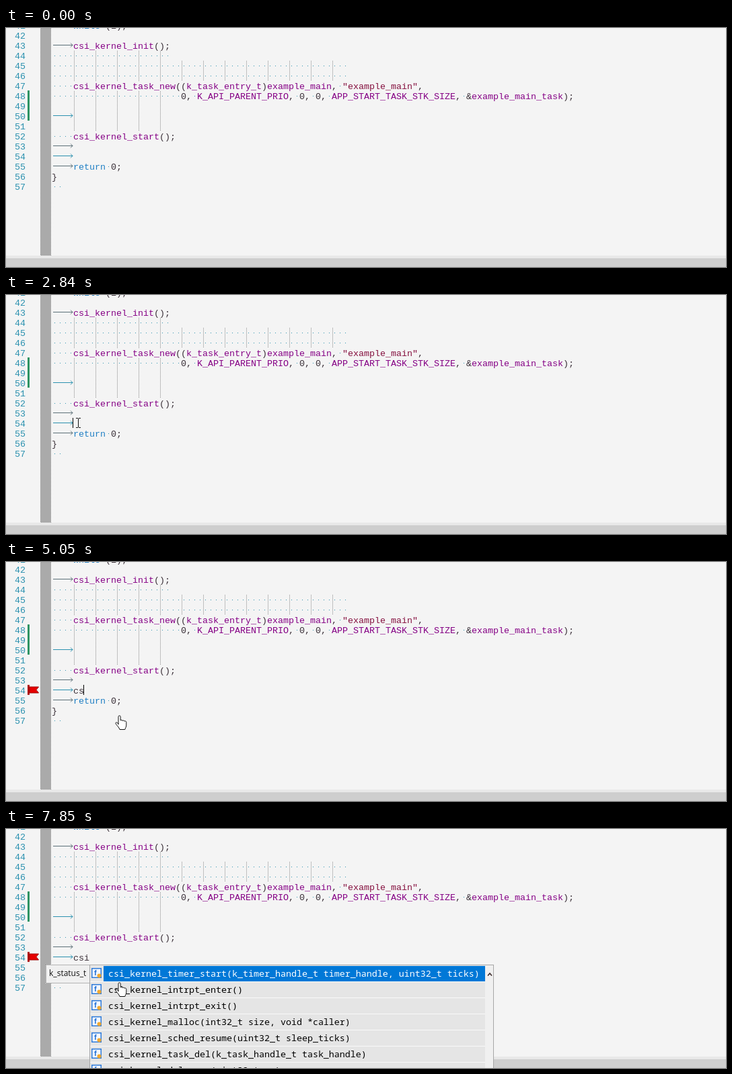
Write an HTML page with a canvas that moves like this. It is 1070x356 px and loops after 8000 ms.

```html
<!DOCTYPE html>
<html lang="en">
<head>
<meta charset="utf-8">
<title>Code completion</title>
<style>
  html, body { margin: 0; width: 100%; height: 100%; overflow: hidden; background: #f4f4f4; }
  canvas { display: block; }
</style>
</head>
<body>
<canvas id="stage" width="1070" height="356"></canvas>
<script>
const ctx = document.getElementById('stage').getContext('2d');
const LOOP = 8000, CHAR = 8, LINE = 15, ROW = 24;
const TEAL = '#2b91af', DARK = '#3a3038';
const CODE_FONT = '13.333px "Liberation Mono", monospace';
const LIST_FONT = '13.333px "Noto Sans Mono", monospace';
const LABEL_FONT = '12px "Open Sans", sans-serif';

// Column 0 is at x = 68; a leading tab is drawn as an arrow.
const source = {
  41: '\twhile (1);',
  43: '\tcsi_kernel_init();',
  44: ' '.repeat(22),
  45: ' '.repeat(55),
  46: ' '.repeat(55),
  47: '    csi_kernel_task_new((k_task_entry_t)example_main, "example_main",',
  48: ' '.repeat(24) + '0, K_API_PARENT_PRIO, 0, 0, APP_START_TASK_STK_SIZE, &example_main_task);',
  50: '\t',
  52: '    csi_kernel_start();',
  53: '\t',
  54: '\t',
  55: '\treturn 0;',
  56: '}',
  57: '  '
};

const items = [
  'task_new(k_task_entry_t task, const char *name, void *arg, k_priority_t prio, uint32_t time_quanta, void *stack)',
  'start()',
  'init()',
  'timer_start(k_timer_handle_t timer_handle, uint32_t ticks)',
  'intrpt_enter()',
  'intrpt_exit()',
  'malloc(int32_t size, void *caller)',
  'sched_resume(uint32_t sleep_ticks)',
  'task_del(k_task_handle_t task_handle)',
  'delay_ms(uint32_t ms)'
].map(name => 'csi_kernel_' + name);

// Pointer moves: start, end, steps, ease-out power, way points.
const moves = [
  [190, 960, 12, 3, [[583, 307], [95, 179]]],
  [1020, 1090, 2, 1, [[100, 182], [104, 185]]],
  [1350, 1760, 6, 1, [[105, 187], [108, 189], [98, 150], [100, 123]]],
  [2090, 2510, 7, 1, [[103, 123], [93, 152], [105, 184]]],
  [2840, 3440, 8, 1, [[107, 190], [113, 152], [169, 229]]]
];

const arrowShape = new Path2D('M.5 .5V16.5L4.2 13 6.8 18.6 9.2 17.5 6.7 12H11.5Z');
const handShape = new Path2D('M5 14V2.5a1.6 1.6 0 0 1 3.2 0V8c.5-1 2.9-.8 2.9 .6c.6-1 2.9-.7 2.9 .7' +
  'c.7-.8 2.8-.4 2.8 1.2V15c0 3-1.5 4-2 6.5H7C6 18 2 15 1 12.5C.5 10.8 2.8 10.3 4 12Z');

function rect(color, x, y, w, h) {
  ctx.fillStyle = color;
  ctx.fillRect(x, y, w, h);
}

function text(str, x, y, color, font) {
  ctx.font = font;
  ctx.fillStyle = color;
  ctx.fillText(str, x, y);
}

function line(color, ...points) {
  ctx.strokeStyle = color;
  ctx.beginPath();
  for (const [x, y] of points) ctx.lineTo(x, y);
  ctx.stroke();
}

function shape(path, x, y) {
  ctx.save();
  ctx.translate(x, y);
  ctx.fillStyle = '#fff';
  ctx.strokeStyle = '#111';
  ctx.fill(path);
  ctx.stroke(path);
  ctx.restore();
}

const lineY = n => 26 + (n - 43) * LINE;

function tokenColor(token) {
  if (/^(return|while)$/.test(token)) return '#1f7fc4';
  if (/^[A-Za-z_]/.test(token)) return '#850085';
  return token[0] === '"' ? '#85103f' : DARK;
}

function codeLine(n, str) {
  const y = lineY(n);
  let x = 68;
  for (const token of str.match(/\t| |"[^"]*"|\w+|[^\w\s"]+/g)) {
    if (token === '\t') {
      const color = n === 50 || n === 54 ? TEAL : '#5c7078';
      line(color, [70, y - .5], [99, y - .5]);
      line(color, [96, y - 3.5], [99, y - .5], [96, y + 2.5]);
      x += 4 * CHAR;
      continue;
    }
    if (token === ' ') rect(TEAL, x + 4, y, 1, 1);
    else text(token, x, y + 5, tokenColor(token), CODE_FONT);
    x += token.length * CHAR;
  }
}

function guides(x0, x1, y0, y1) {
  ctx.setLineDash([1, 1]);
  for (let x = x0; x <= x1; x += 4 * CHAR) line('#8c8c8c', [x + .5, y0], [x + .5, y1]);
  ctx.setLineDash([]);
}

function makeHatch() {
  const tile = document.createElement('canvas');
  tile.width = tile.height = 2;
  const g = tile.getContext('2d');
  g.fillStyle = '#f4f4f4';
  g.fillRect(0, 0, 2, 2);
  g.fillStyle = '#606060';
  g.fillRect(0, 0, 1, 1);
  g.fillRect(1, 1, 1, 1);
  return ctx.createPattern(tile, 'repeat');
}
const hatch = makeHatch();

function editor() {
  rect('#f4f4f4', 0, 0, 1070, 339);
  rect('#e8e8e8', 0, 339, 1070, 4);
  rect('#cecece', 0, 343, 1070, 13);
  rect(hatch, 51, 0, 16, 339);
  rect('#2e9463', 32, 93, 3, 45);
  guides(101, 229, 34, 79);
  guides(261, 485, 49, 79);
  guides(101, 229, 94, 153);
  for (let n = 41; n <= 57; n++) {
    text(n, 13, lineY(n) + 5, TEAL, CODE_FONT);
    if (source[n]) codeLine(n, source[n]);
  }
}

function bookmark() {
  rect('#b01010', 32, 183, 3, 15);
  ctx.fillStyle = '#e60000';
  ctx.strokeStyle = '#a00808';
  ctx.beginPath();
  for (const [x, y] of [[35, 186], [48.5, 186], [45, 190.5], [48.5, 195], [35, 195]]) ctx.lineTo(x, y);
  ctx.closePath();
  ctx.fill();
  ctx.stroke();
}

function icon(x, y) {
  rect('#2f7bd9', x, y, 15, 15);
  rect('#f2f7ff', x + 1.5, y + 1.5, 12, 12);
  text('f', x + 4, y + 11, '#1f6fd6', 'bold 11px "Liberation Sans", sans-serif');
  ctx.fillStyle = '#f0a830';
  ctx.beginPath();
  ctx.arc(x + 11.5, y + 11.5, 3, 0, 7);
  ctx.fill();
}

function popup(x, scroll) {
  const right = scroll ? 725 : 1200, rowEnd = right - 13;
  rect('#b4b4b4', x - 65, 202, 65, 28);
  rect('#f0f0f0', x - 64, 203, 64, 26);
  text('k_status_t', x - 60, 219, '#111', LABEL_FONT);

  rect('#a6a6a6', x, 202, right - x, 154);
  rect('#f0f0f0', x + 1, 203, right - x - 2, 153);
  for (let i = 0; i < 7; i++) {
    const y = 204 + i * ROW;
    rect('#e5e5e5', x + 1, y, rowEnd - x - 1, ROW - 1);
    rect('#f9f9f9', x + 1, y + ROW - 1, rowEnd - x - 1, 1);
    if (!i) rect('#0078d7', x + 21, y, rowEnd - x - 21, ROW - 1);
    icon(x + 3, y + 3);
    text(items[scroll + i], x + 28, y + 16, i ? '#000' : '#fff', LIST_FONT);
  }
  ctx.lineWidth = 1.6;
  line('#3c2a2a', [right - 9, 218.5], [right - 6, 215], [right - 3, 218.5]);
  ctx.lineWidth = 1;
}

function pointerAt(t) {
  const move = moves.findLast(m => t >= m[0]);
  if (!move) return null;
  const [start, end, steps, power, points] = move;
  const step = Math.floor(Math.min(1, (t - start) / (end - start)) * (steps - 1) + 1e-6);
  const along = (1 - (1 - step / (steps - 1)) ** power) * (points.length - 1);
  const i = Math.min(Math.floor(along), points.length - 2);
  return points[i].map((v, axis) => Math.round(v + (points[i + 1][axis] - v) * (along - i)));
}

function pointer(t) {
  const at = pointerAt(t);
  if (!at) return;
  const [x, y] = at;
  if (t < 2840) shape(arrowShape, x - .5, y - .5);
  else if (t >= 4250) shape(handShape, x - 7, y - 1);
  else {
    rect('#111', x, y - 6, 1, 13);
    for (const edge of [y - 7, y + 7]) {
      rect('#111', x - 3, edge, 3, 1);
      rect('#111', x + 1, edge, 3, 1);
    }
  }
}

const within = (t, ...spans) => spans.some(([a, b]) => t >= a && t < b);
const passed = (t, ...times) => times.filter(time => t >= time).length;

function draw(t) {
  editor();
  const typed = passed(t, 4190, 4920, 5250);
  if (typed) bookmark();
  text('csi'.slice(0, typed), 100, lineY(54) + 5, DARK, CODE_FONT);
  if (within(t, [2840, 3440], [3990, 4650], [4920, 5640], [6190, 6720], [7250, 7850]))
    rect('#000', 99 + typed * CHAR, 183, 1, 15);
  if (within(t, [4250, 4380], [4450, 5050], [5120, LOOP]))
    popup(108 + CHAR * passed(t, 5120, 5450), passed(t, 6120, 6590, 7050));
  pointer(t);
}

const began = performance.now();
function tick() {
  draw((performance.now() - began) % LOOP);
  requestAnimationFrame(tick);
}
tick();
</script>
</body>
</html>
```
